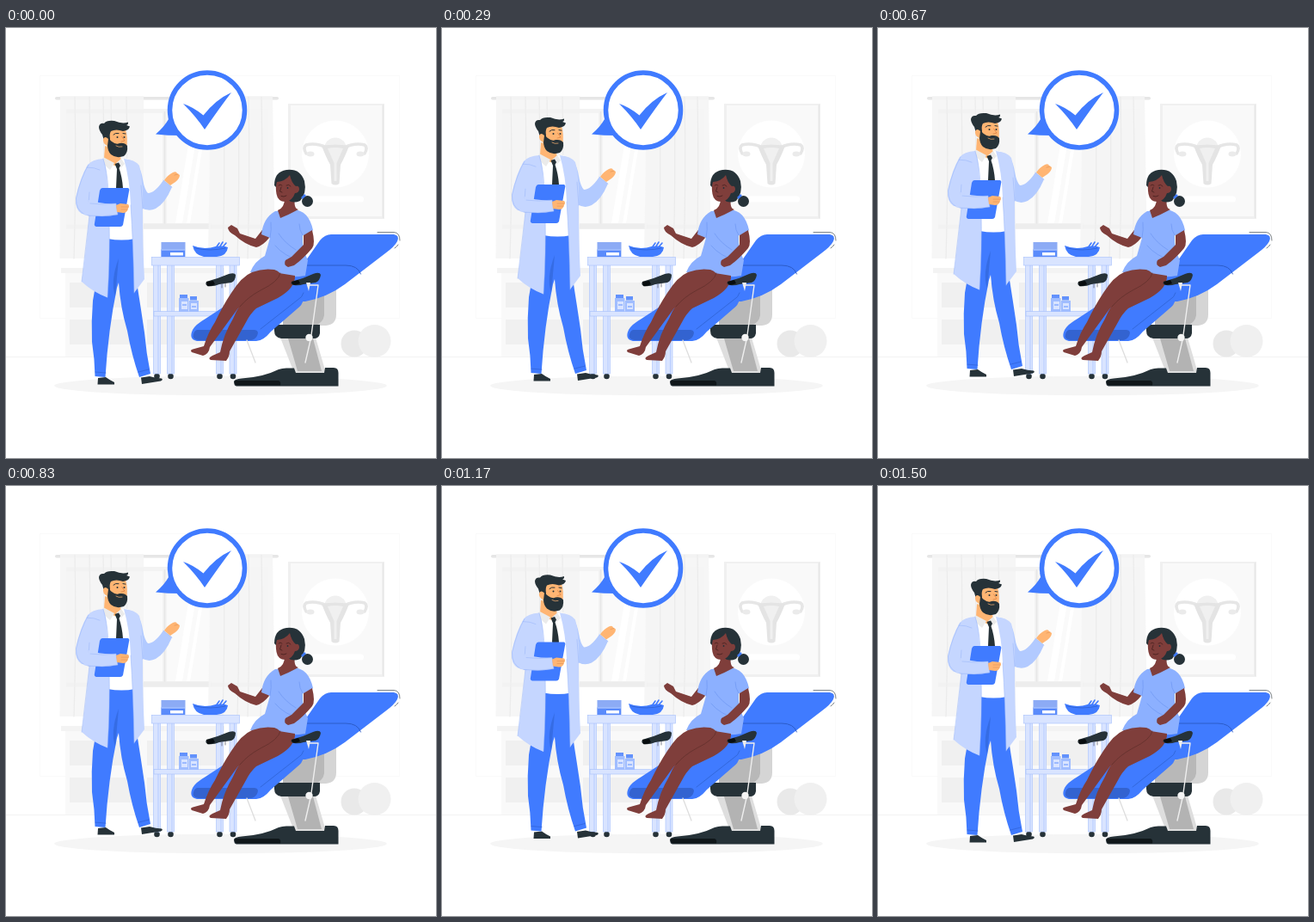
Recreate the animation shown at these times as an HTML page. Size 500 by 500 pixels, loop 1.54 s.

```html
<!DOCTYPE html>
<html lang="en">
<head>
<meta charset="utf-8">
<title>Clinic visit</title>
<style>
html, body { margin: 0; width: 100%; height: 100%; overflow: hidden; background: #fff; }
svg { display: block; width: 100%; height: 100%; }
.blue { fill: #407bff; }
.pale { fill: #d9e4ff; }
.coat { fill: #c5d6ff; }
.dark { fill: #263238; }
.skin { fill: #ffb573; }
.brown { fill: #7f3e3b; }
.line { fill: none; stroke-linecap: round; stroke-linejoin: round; }
</style>
</head>
<body>
<svg viewBox="0 0 500 500" xmlns="http://www.w3.org/2000/svg">
  <!-- room -->
  <rect x="39.5" y="55.5" width="418" height="282" fill="none" stroke="#fafafa"/>
  <path d="M0 382.500H500" stroke="#f0f0f0" stroke-width=".8"/>
  <ellipse cx="249.500" cy="416" rx="193.500" ry="11.300" fill="#f5f5f5"/>

  <!-- window -->
  <g>
    <rect x="70" y="94" width="235" height="140" fill="#f3f3f3"/>
    <rect x="76" y="99" width="106" height="128" fill="#fafafa"/>
    <rect x="187" y="99" width="112" height="128" fill="#fafafa"/>
    <path d="M184.500 97V228" stroke="#e6e6e6" stroke-width="1.500"/>
    <path d="M213 130H221L205 227H197ZM226 130H230L214 227H210Z" fill="#fff"/>
    <path d="M160 230.500H240" stroke="#ededed" stroke-width="6"/>
    <rect x="57" y="80" width="260" height="3.600" rx="1.800" fill="#e6e6e6"/>
    <path d="M63 79H160V268H62.500ZM238 79H310L313 268H235Z" fill="#f5f5f5" opacity=".9"/>
    <path id="folds" class="line" stroke="#ebebeb" stroke-width="1.200"/>
    <path d="M70 97H160M70 231H160M238 231H306" stroke="#f0f0f0" stroke-width="5" opacity=".55"/>
  </g>

  <!-- cabinet -->
  <g>
    <rect x="69" y="284" width="180" height="98" fill="#f9f9f9"/>
    <rect x="64" y="279" width="190" height="6" fill="#f3f3f3"/>
    <path d="M74 296H154V325H74ZM74 339H154V368H74ZM164 296H244V325H164ZM164 339H244V368H164Z" fill="#f0f0f0"/>
  </g>

  <!-- poster -->
  <g>
    <rect x="328" y="88" width="112" height="134" fill="#f0f0f0"/>
    <rect x="331" y="90" width="106" height="129" fill="#f9f9f9"/>
    <path d="M438.500 89V221" stroke="#e6e6e6"/>
    <circle cx="383" cy="146.500" r="39" fill="#fff"/>
    <rect x="351" y="195.500" width="65" height="7" rx="3.500" fill="#fff"/>
    <circle cx="383" cy="140.500" r="13" fill="#f0f0f0"/>
    <path class="line" d="M373 139Q360 133 349 136Q345 139 349 146M393 139Q406 133 417 136Q421 139 417 146" stroke="#e6e6e6" stroke-width="3.500"/>
    <ellipse cx="354" cy="146.500" rx="4.500" ry="3" fill="#ebebeb"/>
    <ellipse cx="412" cy="146.500" rx="4.500" ry="3" fill="#ebebeb"/>
    <path d="M367 137Q383 134 399 137Q394 150 389 159L387.500 181Q383 184 378.500 181L377 159Q372 150 367 137Z" fill="#e4e4e4"/>
    <path d="M374 140Q383 138 392 140L384.500 157V178H381.500V157Z" fill="#f0f0f0"/>
  </g>

  <circle cx="405" cy="367" r="15.500" fill="#e9e9e9"/>
  <circle cx="428.500" cy="364" r="19" fill="#f0f0f0"/>

  <!-- trolley -->
  <g>
    <g id="legs"></g>
    <rect class="pale" x="172" y="329.500" width="96" height="5.500" stroke="#a6c0fc" stroke-width=".6"/>
    <rect class="pale" x="169.500" y="266.500" width="102" height="9.500" stroke="#a6c0fc" stroke-width=".6"/>
    <rect x="180.500" y="249" width="28" height="17" fill="#8cabf5"/>
    <path class="blue" d="M180.500 257.500H208V266H180.500Z" opacity=".65"/>
    <path d="M191 261H206V264.500H191Z" fill="#fff"/>
    <path d="M181 258H208" stroke="#c5d6ff"/>
    <path class="line" d="M243 257L248 250M247 257L252 249M250 257L256 250" stroke="#407bff" stroke-width="1.600"/>
    <path class="blue" d="M217 253Q226 257 238 255.500Q249 252 258 255Q257 265 245 266H230Q219 264 217 253Z"/>
    <path class="line" d="M220 256Q237 260 255 256" stroke="#2f61d2" stroke-width=".8"/>
    <path d="M201 314H212.500V330H201ZM213 317H224V330H213Z" fill="#a0bdff"/>
    <path class="blue" d="M202 310H211V314H202ZM214 312H222V316.500H214Z" opacity=".8"/>
    <path d="M204 318H211V327H204ZM215 320H222V327H215Z" fill="#d9e4ff"/>
    <path d="M205 322H210M216 324H221" stroke="#407bff" stroke-width=".8"/>
  </g>

  <!-- chair -->
  <g>
    <path d="M340 305H384V333Q384 345 372 346H340Z" fill="#d5d5d5"/>
    <path d="M322 306H370V334Q369 342 360 346H322Z" fill="#b8b8b8"/>
    <path d="M319 360H360L372 401H335Z" fill="#dedede"/>
    <path d="M328 361H357L367 399H339Z" fill="#b3b3b3"/>
    <path class="dark" d="M312 345H365V355Q364 361 358 361H320Q312 360 312 352Z"/>
    <path class="dark" d="M265 411Q266 408 274 407.500Q299 406 317 397Q321 395.500 326 395.500H335L337 401H370L371 395H381Q386.500 395 386.500 401V416.500H268Q265 416 265 411Z"/>
    <path d="M266 410H317Q320 411 319 415.500H268Q265 414 266 410Z" fill="#10171a"/>
    <path class="blue" d="M378 240H451Q458 241 455 248Q452 254 441 262L394 298Q374 313 348 318H315L342 280L365 247Q371 240 378 240Z"/>
    <path class="line" d="M343 276H395Q409 276 412.500 286" stroke="#2c5cc8"/>
    <path class="blue" d="M217 351Q220 345 232 338L287 302L346 308V315Q345 322 338 327L308 353Q299 364 291 364H222Q212 362 217 351Z"/>
    <path d="M222 351H289Q295 352 292 358Q289 363 284 363H224Q216 362 218 356Q219 352 222 351Z" fill="#3363d0"/>
    <path class="line" d="M346 308Q345 313 338 317L296 350" stroke="#2f62d2" stroke-width=".8"/>
    <path class="line" d="M432 237.500H451Q458 238 458 247M452 256Q455 254 456 252" stroke="#263238" stroke-width=".6"/>
    <path class="line" d="M280 363L290 389" stroke="#ddd" stroke-width="1.300"/>
  </g>

  <!-- patient -->
  <g>
    <path class="brown" d="M301 231L306 244Q299 253 291 255Q278 252 266 241Q258 237 258 232L262 229L269 233L272 239L290 245Z"/>
    <path d="M313 213L334 211Q352 212 357 235Q351 241 345 241Q344 257 351 270L348 288Q332 291 308 287L284 284Q289 271 301 265L307 244L297 240Q299 221 313 213Z" fill="#8cb0ff"/>
    <path class="line" d="M307 244Q309 234 308 226M345 241Q341 235 341 228M317 239Q324 250 337 258M313 253Q324 266 342 270" stroke="#6f97f2" stroke-width=".7"/>
    <path class="brown" d="M305 283L336 288Q337 302 316 314L291 326Q284 332 278 344L260 376Q260 382 256 387L238 386Q234 384 240 381L249 377Q253 356 264 338Q271 321 282 310Z"/>
    <path class="brown" d="M286 284Q299 279 312 281Q320 283 320 291Q315 299 296 307Q277 317 269 327L237 371Q236 379 229 381L216 377Q213 374 219 373L230 370Q235 354 243 342Q252 323 262 308Q274 289 286 284Z"/>
    <path class="line" d="M319 285Q317 295 296 305Q281 313 272 324" stroke="#63302d" stroke-width=".8"/>
    <path class="brown" d="M346 241L356 235Q360 251 356 256Q346 268 335 276L328 278Q322 275 325 270L332 266L346 252Z"/>
    <path class="brown" d="M324 198L336 196Q334 210 340 211Q329 217 319 221L316 212Q324 209 324 198Z"/>
    <circle class="dark" cx="350.500" cy="201.500" r="6.500"/>
    <path class="dark" d="M312 183Q312 167 326 165Q342 163 347 178Q350 192 342 201Q333 205 327 199Z"/>
    <path class="brown" d="M315 179Q325 178 330 171Q332 180 337 184Q341 183 341 188Q340 192 336 192Q333 201 325 202Q316 202 314.500 193Q313 185 315 179Z"/>
    <path class="line" d="M317 183Q319 181 321 183M326 183Q329 181 331 184M320 185L318.500 190L321 191M320 195.500Q323 197 326 195" stroke="#3d1c1a" stroke-width=".7"/>
    <circle cx="327.500" cy="186" r=".9" fill="#263238"/>
    <path d="M344 198L348 194" stroke="#407bff" stroke-width="2.500"/>
    <path class="dark" d="M233 295Q239 293 246 291L259 286Q266 284 267 287Q267 294 262 296L248 298Q241 301 235 300Q231 299 233 295ZM332 295Q338 293 345 291L357 286Q365 283 366 287Q365 294 360 296L346 298Q340 300 335 299Q330 298 332 295Z"/>
    <path d="M233 295L241 294L243 298Q237 301 234 300ZM332 295L340 293L342 297Q336 300 333 298Z" fill="#080d0f"/>
    <path class="line" d="M352 299H363L355 357M354 363L348 389" stroke="#eee" stroke-width="1.400"/>
    <path class="line" d="M251 298V302M255 297V301" stroke="#667" stroke-width=".8"/>
    <path d="M349 296H354L352 306Z" fill="#eee"/>
    <circle cx="352.500" cy="360" r="4.200" fill="#f5f5f5"/>
  </g>

  <!-- speech bubble -->
  <path class="blue" d="M174 123.500Q184 115 189 106L202 125Q188 125 174 123.500Z"/>
  <circle cx="234" cy="95.500" r="43.500" fill="#fff" stroke="#407bff" stroke-width="5.500"/>
  <path class="blue" d="M206 88Q218 92 229.500 101.500Q244 83 262 75Q249 92 231 118Q221 103 206 88Z"/>

  <!-- doctor -->
  <g id="doctor">
    <path class="dark" d="M107 407L116 406Q120 409 126 412V414.500H106.500ZM157 406.500L167 405Q174 407 181 407.500Q183 409 180 410.500L158 414Z"/>
    <path class="blue" d="M119 243H149Q150 275 153 302Q157 327 161 354Q163 378 168 402L155 406Q146 380 141 352Q133 325 131 296L129 302Q119 350 115.500 406L103.500 405Q103 384 100 365Q99 341 101 317Q107 278 119 243Z"/>
    <path class="line" d="M104 400L116 401M154 400L166 397" stroke="#2e61d5" stroke-width=".7"/>
    <path d="M131 268L127 312Q121 294 131 268Z" fill="#2f62d2" opacity=".6"/>
    <path d="M112 153L142 152L150 245Q135 248 118 245Z" fill="#fff"/>
    <path class="skin" d="M115 137L132 145L134 154Q130 161 126 160L114 152Z"/>
    <path d="M113 150L126 157L121 165L112 157ZM128 157L134 152L138 158L134 162Z" fill="#ebebeb"/>
    <path class="dark" d="M126.500 158L131 156.500L133 160L131.500 163Q135 173 136 186L132 191L128 186L129 164Z"/>

    <!-- coat -->
    <path fill="#b2caff" d="M147 155Q156 158 159 176Q161 188 165 192Q173 192 183 177L193 185Q185 204 174 210Q166 214 157 209Z"/>
    <path class="coat" d="M137 152Q150 153 155 160Q160 179 159 212Q159 254 161 292L149 308Q148 250 145 206Q144 176 137 152Z"/>
    <path class="coat" d="M113 152Q100 153 95 159Q86 174 81 198Q80 211 88 216L97 218Q93 260 88 295Q101 307 118 313.500Q121 267 120 219L118 183Q117 161 113 152Z"/>
    <path class="line" d="M94 162Q103 162 109 165M97 191L96 205Q111 204 128 203M97 218L120 217M113 152Q118 168 119 190M120 219Q121 267 118 313M145 206Q148 250 149 308M159 210L157 183M183 177L193 185M96 159Q87 174 81.500 198Q81 212 92 217L97 218L88 295" stroke="#94b2f8" stroke-width=".5"/>

    <path class="blue" d="M112 186H142Q144 187 143 190L136 229Q135 231 133 231H105Q102 230 103 227L109 189Q110 186 112 186Z"/>
    <path class="coat" d="M96 200Q110 205 128 204L130 217Q112 221 90 217Z"/>
    <path class="line" d="M98 204Q112 206 128 204L130 217Q113 220 95 218" stroke="#94b2f8" stroke-width=".5"/>
    <path class="skin" d="M128 206L133 204L142 205Q144 207 142 210Q141 215 136 215L129 214Z"/>
    <path class="line" d="M134 208L142 208M134 211L141 211" stroke="#d9894c" stroke-width=".5"/>
    <path class="skin" d="M184 177Q188 171 194 168Q198 166 199 169L202 171Q202 175 197 179L191 183Z"/>
    <path class="line" d="M196 171L200 170" stroke="#d9894c" stroke-width=".5"/>

    <!-- head -->
    <path class="skin" d="M116 119Q126 114 139 118Q142 128 140 141Q136 148 128 147Q119 144 117 137Z"/>
    <path class="dark" d="M118 136Q117 128 120 124Q119.500 130 123 132Q128 136 132 134Q138 133 141 137Q142 145 137 149Q128 152 122 147Q118 143 118 136Z"/>
    <path class="dark" d="M114 131L112 124Q108 119 108 115Q109 110 114 111Q117 107 126 108Q135 112 142 109.500Q142.500 112 140 113L144 114.500Q143 119 136 120Q128 117 122 120Q120 123 121 129L118 133Z"/>
    <path class="skin" d="M119 129Q115 125 113 129Q112 134 118 137Z"/>
    <path class="line" d="M125 124Q127 121.500 131 122.500M136 122.500L139 123" stroke="#263238"/>
    <circle class="dark" cx="129.500" cy="127" r="1"/>
    <circle class="dark" cx="137.500" cy="127" r="1"/>
    <path class="line" d="M134.500 126L138 131L134 132" stroke="#d97b3e" stroke-width=".7"/>
    <path class="line" d="M128 137Q131 139 135 138" stroke="#ffb573" stroke-width=".7"/>
  </g>
</svg>
<script>
const LOOP = 1540, BOB = 1.5, LIFT = 10, FPS = 24;
const $ = id => document.getElementById(id);

$('folds').setAttribute('d',
  [80, 97, 113, 122, 140, 253, 270, 282, 297].map(x => `M${x} 80Q${x + 2} 170 ${x - 1} 268`).join(''));

$('legs').innerHTML = [171.5, 187.5, 244.5, 260].map(x =>
  `<circle class="dark" cx="${x + 4}" cy="405" r="3.3"/>
   <rect class="pale" x="${x}" y="275" width="8" height="127" stroke="#a6c0fc" stroke-width=".6"/>
   <path d="M${x + 5.5} 276V402" stroke="#b5cbff" stroke-width="1"/>`).join('');

// Linear rise and fall, sampled at 24 fps, with a short rest at the end.
function draw(ms) {
  const sec = Math.floor((ms % LOOP + 5) * FPS / 1000) / FPS;
  const rise = Math.max(0, 1 - Math.abs(2 * sec / BOB - 1));
  $('doctor').setAttribute('transform', `translate(0 ${-LIFT * rise})`);
}

const start = performance.now();
function tick(now) {
  draw(Math.max(0, now - start));
  requestAnimationFrame(tick);
}
draw(0);
requestAnimationFrame(tick);
</script>
</body>
</html>
```
